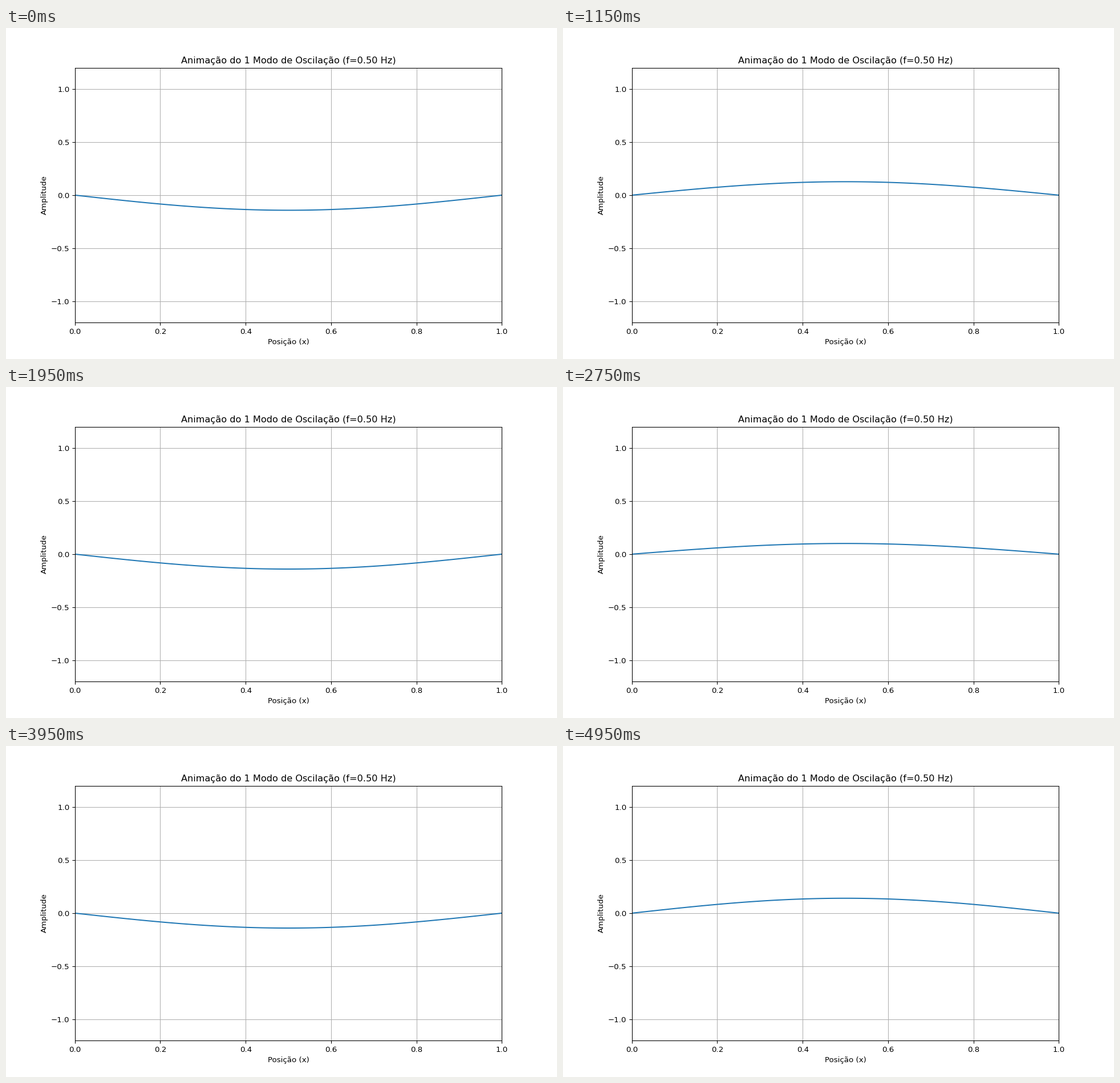
A matplotlib script that plays this animation: 966x580 px, repeating every 5000 ms.

```python
import numpy as np
import matplotlib.pyplot as plt
from matplotlib.animation import FuncAnimation

FRAMES = 100
INTERVAL = 50   # ms
FREQ = 0.5      # Hz
POINTS = 100

x = np.linspace(0, 1, POINTS)
mode = -np.sin(np.pi * x)
mode /= np.linalg.norm(mode)

plt.rcParams["font.family"] = "DejaVu Sans"
fig, ax = plt.subplots(figsize=(10, 6.00415), dpi=96.6)
ax.set_xlim(0, 1)
ax.set_ylim(-1.2, 1.2)
ax.set_title(f"Animação do 1 Modo de Oscilação (f={FREQ:.2f} Hz)")
ax.set_xlabel("Posição (x)")
ax.set_ylabel("Amplitude")
ax.grid(True)
line, = ax.plot(x, mode, color="#1f77b4", lw=1.5)


def update(frame):
    t = frame * INTERVAL / 1000
    line.set_ydata(mode * np.cos(2 * np.pi * FREQ * t))
    return line,


anim = FuncAnimation(fig, update, frames=FRAMES, interval=INTERVAL,
                     repeat=True, repeat_delay=0)
plt.show()
```
